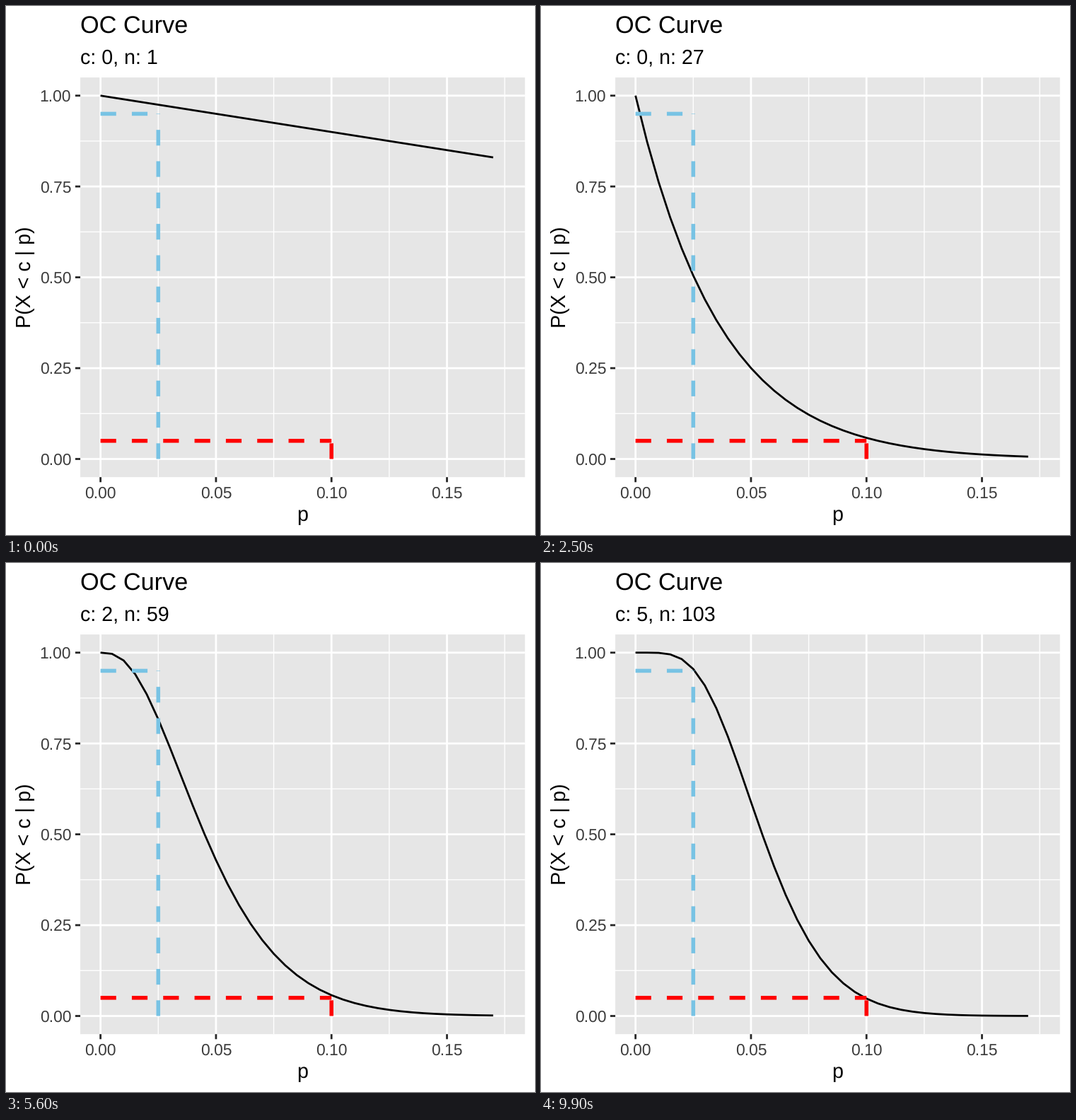
Write a matplotlib script that moves like this. It is 748 px wide and 748 px high and loops after 10 s.

```python
from math import comb

import matplotlib.pyplot as plt
import numpy as np
from matplotlib.animation import FuncAnimation
from matplotlib.patches import Rectangle

SIZE, DPI, FRAMES = 748, 187, 100
LEFT, RIGHT, TOP, BOTTOM = 105.05, 733.75, 101.05, 666.2
P_MAX, N_MAX = 0.175, 103
GOOD, BAD = (0.025, 0.95), (0.10, 0.05)  # producer and consumer risk points
GREY, SKY, RED = "#E6E6E6", "#78C3E4", "#FF0000"
TICK, LABEL = "#262626", "#3C3C3C"
LINE = 2.77 * 72 / DPI  # base line width in points

plt.rcParams.update({
    "font.family": "Liberation Sans",
    "text.hinting": "none",
    "path.snap": False,
})


def px(p):
    return LEFT + (RIGHT - LEFT) * (p / P_MAX + 0.05) / 1.1


def py(y):
    return BOTTOM - (BOTTOM - TOP) * (y + 0.05) / 1.1


def accept(p, n, c):
    """Chance of at most c defects in a sample of n."""
    return sum(comb(n, k) * p**k * (1 - p)**(n - k) for k in range(c + 1))


def search():
    """Grow n one at a time; raise c once the consumer risk is met."""
    c, plans = 0, []
    for n in range(1, N_MAX + 1):
        plans.append((c, n))
        if accept(BAD[0], n, c) <= BAD[1]:
            c += 1
    return plans


fig = plt.figure(figsize=(SIZE / DPI, SIZE / DPI), dpi=DPI, facecolor="white")
ax = fig.add_axes([0, 0, 1, 1])
ax.set_xlim(0, SIZE)
ax.set_ylim(SIZE, 0)
ax.axis("off")


def line(xs, ys, color, width=1, z=2, **kw):
    kw = {"solid_capstyle": "butt", "dash_capstyle": "butt", **kw}
    return ax.plot(xs, ys, color=color, lw=LINE * width, zorder=z, **kw)[0]


def text(x, y, s, size, color="black", **kw):
    return ax.text(x, y, s, fontsize=size, color=color, va="baseline", **kw)


def grid(xs, ys, width):
    for x in xs:
        line([px(x)] * 2, [TOP, BOTTOM], "white", width)
    for y in ys:
        line([LEFT, RIGHT], [py(y)] * 2, "white", width)


def guide(point, color):
    x, y = px(point[0]), py(point[1])
    dash = {"ls": (0, (4, 4)), "z": 4}
    line([px(0), x], [y, y], color, 2, **dash)
    line([x, x], [py(0), y], color, 2, **dash)


ax.add_patch(Rectangle((LEFT, TOP), RIGHT - LEFT, BOTTOM - TOP,
                       facecolor=GREY, lw=0, zorder=1))
x_major, y_major = np.arange(4) * 0.05, np.arange(5) * 0.25
grid(x_major + 0.025, y_major[:-1] + 0.125, 0.5)
grid(x_major, y_major, 1)

for v in x_major:
    line([px(v)] * 2, [BOTTOM, BOTTOM + 7.1], TICK)
    text(px(v), 695.6, f"{v:.2f}", 8.8, LABEL, ha="center")
for v in y_major:
    line([LEFT - 7.1, LEFT], [py(v)] * 2, TICK)
    text(92.2, py(v) + 8.1, f"{v:.2f}", 8.8, LABEL, ha="right")

text(LEFT, 39, "OC Curve", 13.2)
subtitle = text(LEFT, 81, "", 11)
text((LEFT + RIGHT) / 2, 727.7, "p", 11, ha="center")
ax.text(34.8, (TOP + BOTTOM) / 2, "P(X < c | p)", fontsize=11, rotation=90,
        ha="right", va="center").set(
            va="center", ha="center", x=27.5)

guide(GOOD, SKY)
guide(BAD, RED)

probs = np.arange(35) * 0.005
curve = line(px(probs), px(probs), "black", z=3, solid_joinstyle="round")
plans = search()


def update(i):
    c, n = plans[round(i * (N_MAX - 1) / (FRAMES - 1))]
    curve.set_ydata(py(accept(probs, n, c)))
    subtitle.set_text(f"c: {c}, n: {n}")
    return curve, subtitle


anim = FuncAnimation(fig, update, frames=FRAMES, interval=100,
                     repeat=True, repeat_delay=0)
plt.show()
```
